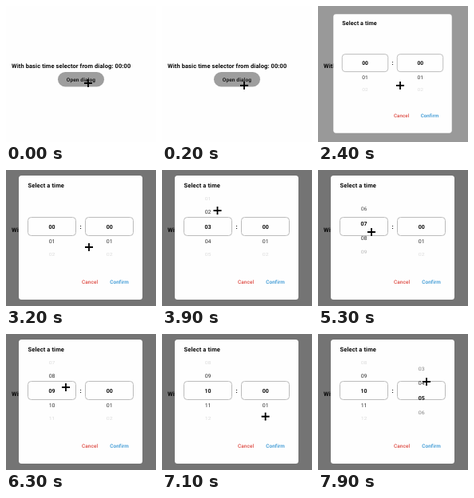
An HTML page for the animation above (8000 ms loop, 188 by 171 pixels).

```html
<!DOCTYPE html>
<html lang="en">
<head>
<meta charset="utf-8">
<title>Time selector dialog</title>
<style>
  html, body { margin: 0; width: 100%; height: 100%; overflow: hidden; background: #fefefe; }
  svg { display: block; width: 188px; height: 171px; }
  text { font: 700 7.5px Roboto, sans-serif; letter-spacing: .1px; fill: #0a0a0a; text-rendering: geometricPrecision; }
  .label { font-size: 6.56px; }
  .action { font-size: 6.4px; font-weight: 500; }
  .cell { font-size: 7px; font-weight: 400; letter-spacing: 0; text-anchor: middle; }
  .cell.on { font-weight: 700; }
  .box { fill: none; stroke: #bcbcbc; }
</style>
</head>
<body>
<svg viewBox="0 0 188 171">
  <text x="7" y="78">With basic time selector from dialog: 00:00</text>
  <rect x="65" y="83" width="58" height="18.4" rx="9.2" fill="#9e9e9e"/>
  <text class="label" x="75.8" y="94.6" style="fill:#1c1c1c">Open dialog</text>
  <rect id="shade" width="188" height="171"/>
  <g id="dialog">
    <rect x="16" y="7" width="155" height="156" rx="3.5" fill="#fefefe"/>
    <text x="27.6" y="21.8">Select a time</text>
    <rect class="box" x="27.5" y="59.5" width="60" height="23" rx="4"/>
    <rect class="box" x="99.5" y="59.5" width="60" height="23" rx="4"/>
    <text x="93.6" y="73.8" text-anchor="middle">:</text>
    <g id="hours"></g>
    <g id="minutes"></g>
    <text class="action" x="95" y="142.7" style="fill:#dd4840">Cancel</text>
    <text class="action" x="130.2" y="142.7" style="fill:#2f92d2">Confirm</text>
  </g>
  <path id="cursor" d="M-5 0H5M0-5V5" stroke="#000" stroke-width="1.8"/>
</svg>
<script>
const LOOP = 8000, STEP = 100, OPEN = 2400;
const CENTER_Y = 71.2, RADIUS = 59, ANGLE = .32;

const clamp = k => Math.max(0, Math.min(1, k));
const smooth = k => k * k * (3 - 2 * k);

// A flicked wheel turns by `turns` and slows down to a stop.
const flick = (t, start, duration, turns) =>
  turns * (1 - (1 - clamp((t - start) / duration)) ** 2);

const hourAt = t => flick(t, 3580, 640, 4) + flick(t, 4600, 1740, 5) + flick(t, 6300, 800, 1);
const minuteAt = t => flick(t, 7300, 1200, 6);

// Where the pointer pauses or turns: [time, x, y]
const stops = [
  [0, 103, 97], [200, 103, 100], [2800, 103, 100], [3200, 104, 97],
  [3500, 70, 105], [3900, 69.5, 51], [4500, 67, 104], [5300, 67, 78],
  [6300, 75, 67], [7300, 136, 108], [7900, 136, 60]
];

function pointerAt(t) {
  const i = Math.max(1, stops.findIndex(stop => stop[0] >= t));
  const [t0, x0, y0] = stops[i - 1], [t1, x1, y1] = stops[i];
  const k = smooth(clamp((t - t0) / (t1 - t0)));
  return [x0 + (x1 - x0) * k, y0 + (y1 - y0) * k];
}

const get = id => document.getElementById(id);
const shade = get("shade"), dialog = get("dialog"), cursor = get("cursor");

function makeWheel(id, x, count) {
  const cells = Array.from({ length: count }, (_, i) => {
    const cell = document.createElementNS("http://www.w3.org/2000/svg", "text");
    cell.textContent = String(i).padStart(2, "0");
    cell.setAttribute("y", 2.5);
    get(id).append(cell);
    return cell;
  });
  return value => cells.forEach((cell, i) => {
    const d = i - value;
    const on = i === Math.round(value);
    const alpha = on ? 1 : Math.min(.85, clamp(1.63 - .75 * Math.abs(d)));
    cell.setAttribute("class", on ? "cell on" : "cell");
    cell.setAttribute("opacity", alpha);
    if (alpha) {
      const y = CENTER_Y + RADIUS * Math.sin(ANGLE * d);
      cell.setAttribute("transform", `translate(${x} ${y}) scale(1 ${Math.cos(ANGLE * d)})`);
    }
  });
}

const setHour = makeWheel("hours", 57.6, 14);
const setMinute = makeWheel("minutes", 129.8, 9);

function draw(t) {
  const full = t >= OPEN + STEP;
  shade.setAttribute("opacity", t < OPEN ? 0 : full ? .54 : .4);
  dialog.setAttribute("visibility", t < OPEN ? "hidden" : "visible");
  dialog.setAttribute("transform", `translate(93.5 85) scale(${full ? 1 : .958}) translate(-93.5 -85)`);
  setHour(hourAt(t));
  setMinute(minuteAt(t));
  const [x, y] = pointerAt(t);
  cursor.setAttribute("transform", `translate(${x} ${y})`);
}

const start = performance.now();
function tick() {
  const t = (performance.now() - start) % LOOP;
  draw(Math.floor(t / STEP) * STEP);
  requestAnimationFrame(tick);
}
tick();
</script>
</body>
</html>
```
